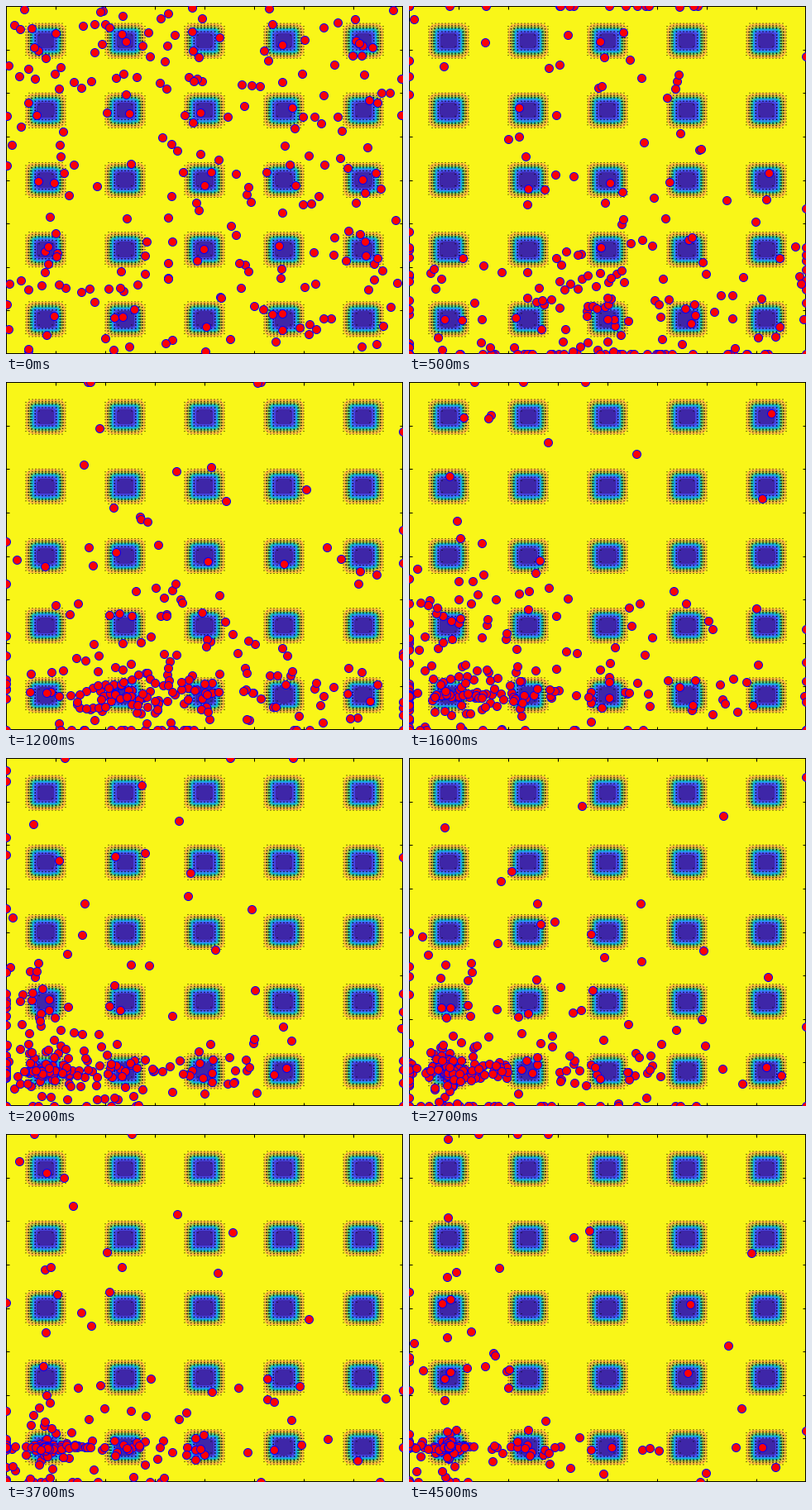
Recreate the animation shown at these times as a matplotlib script. Size 480x421 px, loop 4600 ms.

```python
import numpy as np
import matplotlib.pyplot as plt
from matplotlib.animation import FuncAnimation

W, H, DPI = 480, 421, 64
PX = 72 / DPI
FRAMES, INTERVAL = 46, 100
COUNT, LIMIT, PULL = 240, 40, 1.8
WELLS = np.arange(-32, 33, 16)
BANDS = ["#3e26a8", "#4743e0", "#4367fd", "#2d8cf3", "#12adda",
         "#25bfb0", "#6ccb6f", "#bcbf38", "#fec03a", "#f9f618"]


def foxholes(x, y):
    """De Jong's fifth function."""
    total = 0.002
    for row, b in enumerate(WELLS):
        for col, a in enumerate(WELLS):
            total = total + 1 / (5 * row + col + 1 + (x - a) ** 6 + (y - b) ** 6)
    return 1 / total


def leader(k):
    x = 0 if k < 9 else -16 if k < 13 else -32
    return np.array([x, -32.0])


def inertia(k):
    """Wide search, settling, a second wide search, then convergence."""
    if k < 6:
        return 1.0
    if k < 21:
        return 0.62
    return 0.9 if k < 27 else 0.5


def swarm():
    """Positions of all particles at every step of the search."""
    rng = np.random.default_rng(12)
    pos = rng.uniform(-LIMIT, LIMIT, (COUNT, 2))
    vel = rng.uniform(-20, 20, (COUNT, 2))
    best, best_cost = pos.copy(), foxholes(*pos.T)
    path = [pos]
    for k in range(1, FRAMES):
        r1, r2 = rng.random((2, COUNT, 2))
        vel = (inertia(k) * vel + PULL * r1 * (best - pos)
               + PULL * r2 * (leader(k) - pos))
        pos = np.clip(pos + vel, -LIMIT, LIMIT)
        cost = foxholes(*pos.T)
        better = cost < best_cost
        best[better], best_cost[better] = pos[better], cost[better]
        path.append(pos)
    return path


def draw_field(ax):
    axis = np.linspace(-LIMIT, LIMIT, 401)
    x, y = np.meshgrid(axis, axis)
    ax.contourf(x, y, foxholes(x, y), levels=np.arange(0, 501, 50), colors=BANDS)

    axis = np.linspace(-LIMIT, LIMIT, 121)
    x, y = np.meshgrid(axis, axis)
    e = 1e-3
    u = (foxholes(x + e, y) - foxholes(x - e, y)) / (2 * e)
    v = (foxholes(x, y + e) - foxholes(x, y - e)) / (2 * e)
    slope = np.hypot(u, v)
    on = slope > 30
    ax.quiver(x[on], y[on], u[on], v[on], angles="xy", scale_units="xy",
              scale=slope.max() / 0.66, units="dots", width=0.8,
              headwidth=2.4, headlength=2.4, headaxislength=2.2,
              minlength=1.6, color="black")


fig = plt.figure(figsize=(W / DPI, H / DPI), dpi=DPI)
ax = fig.add_axes([0, 0, 1, 1])
draw_field(ax)
ax.set(xlim=(-LIMIT, LIMIT), ylim=(-LIMIT, LIMIT),
       xticks=range(-30, 31, 10), yticks=range(-30, 31, 10))
ax.tick_params(direction="in", top=True, right=True, length=4 * PX,
               width=PX, labelbottom=False, labelleft=False)
for spine in ax.spines.values():
    spine.set_linewidth(2 * PX)

path = swarm()
dots, = ax.plot([], [], "o", ms=10 * PX, mfc="red", mec="blue", mew=PX, zorder=5)


def update(k):
    dots.set_data(*path[k].T)
    return dots,


anim = FuncAnimation(fig, update, frames=FRAMES, interval=INTERVAL,
                     repeat=True, repeat_delay=0, blit=False)
plt.show()
```
